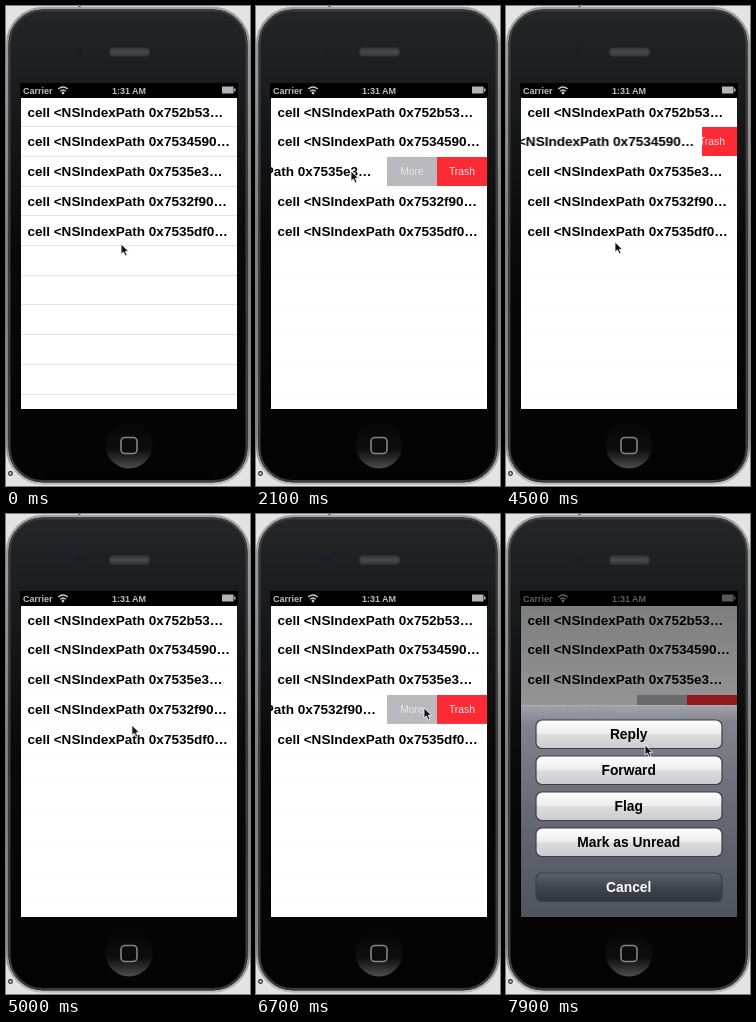
Animation of 244 by 480 pixels, one loop 8000 ms. Source, as an HTML page:

```html
<!DOCTYPE html>
<html lang="en">
<head>
<meta charset="utf-8">
<title>Swipe cells</title>
<style>
html, body { margin: 0; width: 100%; height: 100%; overflow: hidden; background: #e3e3e3; }
svg { display: block; width: 244px; height: 480px; }
text { font-family: "Liberation Sans", Arial, sans-serif; }
.cell { font-weight: bold; font-size: 13.54px; }
.status { font-weight: bold; font-size: 9px; fill: #bdbdbd; }
.action { font-size: 10.4px; text-anchor: middle; }
.option { font-weight: bold; font-size: 13.8px; text-anchor: middle; }

.row2, .row3, .row4, #sheet, #dim, #cursor, .lines { animation: 8s linear infinite; }
.row2 { animation-name: row2; }
.row3 { animation-name: row3; }
.row4 { animation-name: row4; }
#sheet { animation-name: sheet; }
#dim { animation-name: dim; }
#cursor { animation-name: cursor; }
.lines { animation-name: lines; }

@keyframes row4 {
  0%, 8% { transform: translateX(0); }
  11.5% { transform: translateX(-60px); }
  14%, 15% { transform: translateX(-103px); }
  16%, 20% { transform: translateX(-101px); animation-timing-function: ease-out; }
  23%, 72% { transform: translateX(0); }
  77%, 100% { transform: translateX(-101px); }
}
@keyframes row3 {
  0%, 21% { transform: translateX(0); }
  26%, 36.5% { transform: translateX(-101px); }
  38.75% { transform: translateX(-10px); }
  39.8%, 100% { transform: translateX(0); }
}
@keyframes row2 {
  0%, 42% { transform: translateX(0); }
  47%, 54.5% { transform: translateX(-101px); }
  56.25% { transform: translateX(-36px); }
  58%, 100% { transform: translateX(0); }
}
@keyframes sheet {
  0%, 88% { transform: translateY(214px); animation-timing-function: ease-in-out; }
  92.5%, 100% { transform: translateY(0); }
}
@keyframes dim {
  0%, 88% { opacity: 0; }
  92.5%, 100% { opacity: 1; }
}
@keyframes cursor {
  0% { transform: translate(115px, 238px); }
  3.75% { transform: translate(150px, 225px); }
  7.5% { transform: translate(185px, 192px); }
  12% { transform: translate(125px, 186px); }
  15% { transform: translate(122px, 177px); }
  20% { transform: translate(180px, 164px); }
  25%, 30% { transform: translate(95px, 165px); }
  33.75% { transform: translate(90px, 148px); }
  38.75% { transform: translate(89px, 142px); }
  41.5% { transform: translate(175px, 136px); }
  46.25% { transform: translate(100px, 137px); }
  51.25% { transform: translate(102px, 165px); }
  55%, 57.5% { transform: translate(109px, 236px); }
  63.75% { transform: translate(130px, 205px); }
  68.75% { transform: translate(114px, 183px); }
  71.5% { transform: translate(180px, 194px); }
  76.25% { transform: translate(95px, 195px); }
  81.25%, 86.5% { transform: translate(168px, 194px); }
  93.75%, 100% { transform: translate(139px, 231px); }
}
@keyframes lines { 0%, 1% { opacity: 1; } 10%, 100% { opacity: .12; } }
</style>
</head>
<body>
<svg viewBox="0 0 244 480">
  <defs>
    <clipPath id="screen"><rect x="15" y="92" width="216" height="311"/></clipPath>
    <clipPath id="display"><rect x="14" y="77" width="218" height="326"/></clipPath>
    <linearGradient id="rim" x2="0" y2="1">
      <stop offset="0" stop-color="#a2a2a2"/><stop offset=".1" stop-color="#9a9a9a"/>
      <stop offset=".5" stop-color="#7c7c7c"/><stop offset=".9" stop-color="#858585"/><stop offset="1" stop-color="#bcbcbc"/>
    </linearGradient>
    <linearGradient id="body" x2="0" y2="1">
      <stop offset="0" stop-color="#25262a"/><stop offset=".16" stop-color="#1b1c1f"/>
      <stop offset=".5" stop-color="#090909"/><stop offset="1" stop-color="#030303"/>
    </linearGradient>
    <linearGradient id="home" x2="0" y2="1">
      <stop offset="0" stop-color="#050505"/><stop offset=".6" stop-color="#0e0e0e"/>
      <stop offset=".8" stop-color="#2c2c2c"/><stop offset="1" stop-color="#4e4e4e"/>
    </linearGradient>
    <linearGradient id="shade" x2="0" y2="1">
      <stop offset="0" stop-opacity=".52"/><stop offset=".35" stop-opacity=".42"/><stop offset="1" stop-opacity=".42"/>
    </linearGradient>
    <linearGradient id="panel" x2="0" y2="1">
      <stop offset="0" stop-color="#a4a7ad"/><stop offset=".09" stop-color="#7f838d"/>
      <stop offset=".5" stop-color="#646873"/><stop offset="1" stop-color="#4d515b"/>
    </linearGradient>
    <linearGradient id="light" x2="0" y2="1">
      <stop offset="0" stop-color="#fff"/><stop offset=".48" stop-color="#ebebec"/>
      <stop offset=".52" stop-color="#dcdcde"/><stop offset="1" stop-color="#cbccce"/>
    </linearGradient>
    <linearGradient id="dark" x2="0" y2="1">
      <stop offset="0" stop-color="#5f636c"/><stop offset=".5" stop-color="#40444d"/><stop offset="1" stop-color="#31353e"/>
    </linearGradient>
    <g id="actions">
      <rect x="131" width="50" height="29" fill="#b9b9be"/>
      <rect x="181" width="51" height="29" fill="#fb2b35"/>
      <text class="action" x="156" y="18" fill="#e6e6e9">More</text>
      <text class="action" x="206" y="18" fill="#ffe0e0">Trash</text>
    </g>
  </defs>

  <rect width="244" height="480" fill="#e3e3e3"/>
  <path d="M0 422.5H244" stroke="#222"/>
  <path d="M73.5 0V3" stroke="#222" stroke-width="2"/>

  <!-- phone -->
  <rect x="1.2" y="2" width="241.6" height="475.6" rx="36" fill="url(#body)" stroke="url(#rim)" stroke-width="2.4"/>
  <rect x="3.5" y="4.5" width="237" height="470.6" rx="33.5" fill="none" stroke="#3c3c3c" stroke-width="2"/>
  <circle cx="4.5" cy="467.5" r="1.8" fill="none" stroke="#222" stroke-width="1.2"/>
  <circle cx="72.5" cy="44.5" r="3.5" fill="#1c1d29"/>
  <rect x="103" y="41.5" width="41" height="9" rx="4.5" fill="#3a3a3b"/>
  <path d="M105 46H142" stroke="#464646" stroke-width="4"/>
  <circle cx="123" cy="439" r="23.5" fill="url(#home)"/>
  <rect x="115" y="431.5" width="16" height="16" rx="4" fill="#0b0b0b" stroke="#858585" stroke-width="1.6"/>

  <!-- status bar -->
  <rect x="14" y="77" width="218" height="17" fill="#000"/>
  <text class="status" x="17" y="87.5">Carrier</text>
  <text class="status" x="123" y="87.5" text-anchor="middle">1:31 AM</text>
  <g fill="none" stroke="#c8c8c8" stroke-width="1.4">
    <path d="M52.3 83Q57 78.8 61.7 83M54.2 85.2Q57 82.6 59.8 85.2"/>
    <circle cx="57" cy="87" r=".7"/>
  </g>
  <path d="M216 80.5h11.5v7H216zM228 82.5h1.5v3H228z" fill="#b4b4b4"/>

  <g clip-path="url(#screen)">
    <rect x="14" y="92" width="218" height="311" fill="#fff"/>
    <g id="rows"></g>
    <path id="lines" class="lines" stroke="#e2e2e2"/>
  </g>

  <g clip-path="url(#display)">
    <rect id="dim" x="14" y="77" width="218" height="326" fill="url(#shade)"/>
    <g id="sheet">
      <rect x="15" y="191" width="216" height="212" fill="url(#panel)" fill-opacity=".97"/>
      <path d="M15 191.5H231" stroke="#b7bbc2" stroke-opacity=".5"/>
    </g>
  </g>

  <path id="cursor" d="M0 0V10.2L2.4 8L4.2 12L6 11.2L4.3 7.3H7.5Z" fill="#111" stroke="#fff" stroke-width=".8"/>
</svg>
<script>
const NS = "http://www.w3.org/2000/svg";
function add(parent, tag, attrs, label) {
  const node = document.createElementNS(NS, tag);
  for (const key in attrs) node.setAttribute(key, attrs[key]);
  if (label) node.textContent = label;
  return parent.appendChild(node);
}

const rows = document.getElementById("rows");
["752b53", "7534590", "7535e3", "7532f90", "7535df0"].forEach((id, i) => {
  const top = Math.floor(92 + i * 29.7);
  if (i > 0 && i < 4) add(rows, "use", { href: "#actions", y: top });
  const cell = add(rows, "g", { class: "row" + (i + 1) });
  add(cell, "rect", { x: 14, y: top, width: 218, height: 29.5, fill: "#fff" });
  add(cell, "text", { class: "cell", x: 21.4, y: 110.6 + i * 29.8 }, `cell <NSIndexPath 0x${id}…`);
});

let lines = "";
for (let i = 1; i <= 10; i++) lines += `M14 ${Math.floor(91 + i * 29.7) + .5}H232`;
document.getElementById("lines").setAttribute("d", lines);

const sheet = document.getElementById("sheet");
function option(label, y, fill, color) {
  add(sheet, "rect", { x: 30, y: y, width: 186, height: 28.5, rx: 6, fill: fill, stroke: "#3c3f47", "stroke-width": 1.2 });
  add(sheet, "text", { class: "option", x: 122.7, y: y + 18.8, fill: color }, label);
}
["Reply", "Forward", "Flag", "Mark as Unread"].forEach((label, i) => option(label, 206 + i * 36, "url(#light)", "#000"));
option("Cancel", 359, "url(#dark)", "#fff");
</script>
</body>
</html>
```
